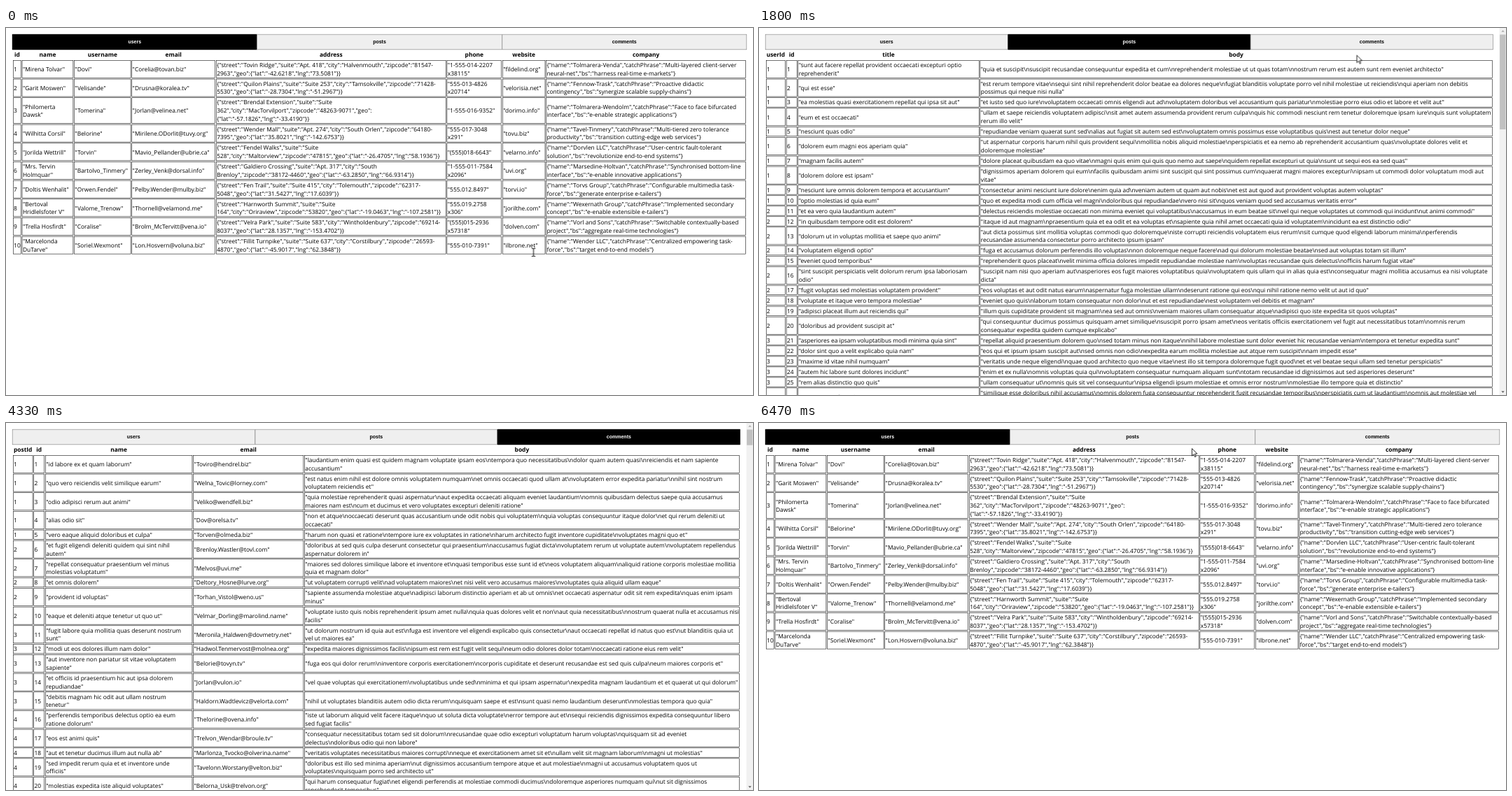
An HTML page that plays this animation: 1067x525 px, repeating every 8470 ms.

```html
<!DOCTYPE html>
<html lang="en">
<head>
<meta charset="utf-8">
<title>Tabbed tables</title>
<style>
html, body { margin: 0; width: 100%; height: 100%; overflow: hidden; background: #fff; }
/* page is laid out at 1920 wide and shown at 1067 */
#page {
  position: absolute; left: 0; top: 0; width: 1920px; height: 945px; overflow: hidden;
  transform: scale(.55573); transform-origin: 0 0;
  font: 15.1px/21px "Open Sans", "Noto Sans", sans-serif; color: #000;
  text-rendering: geometricPrecision;
}
#bar, #page button, .view, svg { animation: 8470ms step-end infinite; }
#bar { position: absolute; left: 16px; top: 16px; width: 1888px; height: 40px; display: flex; animation-name: bar; }
#page button {
  flex: 1 1 0; margin: 0; padding: 0; border: 1px solid #767676; border-radius: 0; background: #efefef;
  font: bold 12.6px "Liberation Sans", Arial, sans-serif; color: #000; pointer-events: none;
}
#page #b-users { animation-name: b-users; }
#page #b-posts { animation-name: b-posts; }
#page #b-comments { animation-name: b-comments; }

.view { position: absolute; inset: 0; }
#users { animation-name: users; }
#posts { animation-name: posts; }
#comments { animation-name: comments; }
table { position: absolute; left: 16px; top: 56px; table-layout: fixed; border-collapse: separate; border-spacing: 2px; white-space: nowrap; }
th { padding: 1px 0; font-weight: 700; }
td { padding: 2px 1px 0; border: 1px solid #000; }
.scroll { position: absolute; right: 0; top: 0; width: 17px; height: 945px; background: #f1f1f1; }
.scroll i { position: absolute; left: 1px; top: 17px; width: 15px; background: #c1c1c1; }
.scroll::before, .scroll::after { content: ""; position: absolute; left: 4.5px; border: 4px solid transparent; }
.scroll::before { top: 2px; border-bottom-color: #a3a3a3; }
.scroll::after { bottom: 2px; border-top-color: #505050; }

svg { position: absolute; left: 0; top: 0; overflow: visible; }
#beam { width: 6px; height: 12px; margin: -6px 0 0 -3px; animation-name: beam; }
#arrow { width: 9px; height: 13px; animation-name: arrow; }

@keyframes bar { 0%, 76.38% { width: 1888px } 21.25% { width: 1871px } }
@keyframes users { 0%, 76.38% { visibility: visible } 21.25%, 76.37% { visibility: hidden } }
@keyframes posts { 0%, 51.12% { visibility: hidden } 21.25% { visibility: visible } }
@keyframes comments { 0%, 76.38% { visibility: hidden } 51.12% { visibility: visible } }
/* button states: idle #efefef, hover #e5e5e5, pressed #f5f5f5, chosen #000 */
@keyframes b-users {
  0%, 75.55%, 100% { background: #000; color: #fff; border-color: #000 }
  19.71% { background: #efefef; color: #000; border-color: #767676 }
  73.19% { background: #e5e5e5; color: #000; border-color: #4f4f4f }
  74.02% { background: #f5f5f5; color: #000; border-color: #8d8d8d }
}
@keyframes b-posts {
  0%, 48.75%, 73.19%, 100% { background: #efefef; color: #000; border-color: #767676 }
  11.8%, 63.75% { background: #e5e5e5; color: #000; border-color: #4f4f4f }
  18.18% { background: #f5f5f5; color: #000; border-color: #8d8d8d }
  19.71% { background: #000; color: #fff; border-color: #000 }
}
@keyframes b-comments {
  0%, 75.55%, 100% { background: #efefef; color: #000; border-color: #767676 }
  44.03% { background: #e5e5e5; color: #000; border-color: #4f4f4f }
  47.22% { background: #f5f5f5; color: #000; border-color: #8d8d8d }
  48.75% { background: #000; color: #fff; border-color: #000 }
}
@keyframes beam {
  0% { transform: translate(753.5px, 321px) }
  .82% { transform: translate(753.5px, 321px); animation-timing-function: steps(11, jump-both) }
  10.27% { transform: translate(808.5px, 75.5px) }
  10.97%, 100% { transform: translate(-50px, -50px) }
}
@keyframes arrow {
  0%, 41.67% { transform: translate(1100px, 34px) }
  10.97% { transform: translate(822px, 55px); animation-timing-function: steps(2, end) }
  12.63% { transform: translate(831px, 38px); animation-timing-function: steps(8, end) }
  18.9% { transform: translate(853.5px, 38.5px) }
  21.26% { transform: translate(853.5px, 38.5px); animation-timing-function: steps(11, end) }
  29.86% { transform: translate(978px, 34px) }
  40.14% { transform: translate(993px, 33px) }
  40.96% { transform: translate(1043px, 33px) }
  63.75% { transform: translate(1090px, 38px); animation-timing-function: steps(12, end) }
  73.19%, 100% { transform: translate(618px, 36px) }
}
</style>
</head>
<body>
<div id="page">
  <div id="bar"><button id="b-users">users</button><button id="b-posts">posts</button><button id="b-comments">comments</button></div>
  <div class="view" id="users"></div>
  <div class="view" id="posts"><div class="scroll"><i style="height:244px"></i></div></div>
  <div class="view" id="comments"><div class="scroll"><i style="height:40px"></i></div></div>
</div>
<svg id="beam" viewBox="0 0 6 12"><path d="M.5.5H2.4L3 1 3.6.5H5.5M3 1V11M.5 11.5H2.4L3 11 3.6 11.5H5.5" fill="none" stroke="#000"/></svg>
<svg id="arrow" viewBox="0 0 13 19"><path d="M.6.8V16.2L4.2 12.8 6.7 18.4 9 17.4 6.6 11.8H11.6Z" fill="#fff" stroke="#000" stroke-width="1.2"/></svg>
<script>
// "~" parts cells, ";" parts fields, "/" is a line break
const users = `
Mirena Tolvar~Dovi~Corelia@tovan.biz~Tovin Ridge;Apt. 418;Halvenmouth;81547-/2963;-42.6218;73.5081~1-555-014-2207/x38115~fildelind.org~Tolmarera-Venda;Multi-layered client-server/neural-net;harness real-time e-markets
Garit Moswen~Velisande~Drusna@koralea.tv~Quilon Plains;Suite 253;Tamsokville;71428-/5530;-28.7304;-51.2967~555-013-4826/x20714~velorisia.net~Fennow-Trask;Proactive didactic/contingency;synergize scalable supply-chains
Philomerta/Dawsk~Tomerina~Jorlan@velinea.net~Brendal Extension;Suite/362;MacTorvilport;48263-9071;-57.1826;-33.4190;/~1-555-016-9352~dorimo.info~Tolmarera-Wendolm;Face to face bifurcated/interface;e-enable strategic applications
Wilhitta Corsil~Belorine~Mirilene.ODorlit@tuvy.org~Wender Mall;Apt. 274;South Orlen;64180-/7395;35.8021;-142.6753~555-017-3048/x291~tovu.biz~Tavel-Tinmery;Multi-tiered zero tolerance/productivity;transition cutting-edge web services
Jorilda Wettrill~Torvin~Mavio_Pellander@ubrie.ca~Fendel Walks;Suite/528;Maltorview;47815;-26.4705;58.1936~(555)018-6643~velarno.info~Dorvlen LLC;User-centric fault-tolerant/solution;revolutionize end-to-end systems
Mrs. Tervin/Holmquar~Bartolvo_Tinmery~Zerley_Venk@dorsal.info~Galdiero Crossing;Apt. 317;South/Brenloy;38172-4460;-63.2850;66.9314~1-555-011-7584/x2096~uvi.org~Marsedine-Holtvan;Synchronised bottom-line/interface;e-enable innovative applications
Doltis Wenhalit~Orwen.Fendel~Pelby.Wender@mulby.biz~Fen Trail;Suite 415;Tolemouth;62317-/5048;31.5427;17.6039~555.012.8497~torvi.io~Torvs Group;Configurable multimedia task-/force;generate enterprise e-tailers
Bertoval/Hridlelsfoter V~Valome_Trenow~Thornell@velamond.me~Harnworth Summit;Suite/164;Oriraview;53820;-19.0463;-107.2581~555.019.2758/x306~jorilthe.com~Wexernath Group;Implemented secondary/concept;e-enable extensible e-tailers
Trella Hosfirdt~Coralise~Brolm_McTervitt@vena.io~Velra Park;Suite 583;Wintholdenbury;69214-/8037;28.1357;-153.4702~(555)015-2936/x57318~dolven.com~Vorl and Sons;Switchable contextually-based/project;aggregate real-time technologies
Marcelonda/DuTarve~Soriel.Wexmont~Lon.Hosvern@voluna.biz~Fillit Turnpike;Suite 637;Corstilbury;26593-/4870;-45.9017;62.3848~555-010-7391~ilbrone.net~Wender LLC;Centralized empowering task-/force;target end-to-end models`;

const posts = String.raw`
sunt aut facere repellat provident occaecati excepturi optio/reprehenderit~quia et suscipit\nsuscipit recusandae consequuntur expedita et cum\nreprehenderit molestiae ut ut quas totam\nnostrum rerum est autem sunt rem eveniet architecto
qui est esse~est rerum tempore vitae\nsequi sint nihil reprehenderit dolor beatae ea dolores neque\nfugiat blanditiis voluptate porro vel nihil molestiae ut reiciendis\nqui aperiam non debitis/possimus qui neque nisi nulla
ea molestias quasi exercitationem repellat qui ipsa sit aut~et iusto sed quo iure\nvoluptatem occaecati omnis eligendi aut ad\nvoluptatem doloribus vel accusantium quis pariatur\nmolestiae porro eius odio et labore et velit aut
eum et est occaecati~ullam et saepe reiciendis voluptatem adipisci\nsit amet autem assumenda provident rerum culpa\nquis hic commodi nesciunt rem tenetur doloremque ipsam iure\nquis sunt voluptatem/rerum illo velit
nesciunt quas odio~repudiandae veniam quaerat sunt sed\nalias aut fugiat sit autem sed est\nvoluptatem omnis possimus esse voluptatibus quis\nest aut tenetur dolor neque
dolorem eum magni eos aperiam quia~ut aspernatur corporis harum nihil quis provident sequi\nmollitia nobis aliquid molestiae\nperspiciatis et ea nemo ab reprehenderit accusantium quas\nvoluptate dolores velit et/doloremque molestiae
magnam facilis autem~dolore placeat quibusdam ea quo vitae\nmagni quis enim qui quis quo nemo aut saepe\nquidem repellat excepturi ut quia\nsunt ut sequi eos ea sed quas
dolorem dolore est ipsam~dignissimos aperiam dolorem qui eum\nfacilis quibusdam animi sint suscipit qui sint possimus cum\nquaerat magni maiores excepturi\nipsam ut commodi dolor voluptatum modi aut/vitae
nesciunt iure omnis dolorem tempora et accusantium~consectetur animi nesciunt iure dolore\nenim quia ad\nveniam autem ut quam aut nobis\net est aut quod aut provident voluptas autem voluptas
optio molestias id quia eum~quo et expedita modi cum officia vel magni\ndoloribus qui repudiandae\nvero nisi sit\nquos veniam quod sed accusamus veritatis error
et ea vero quia laudantium autem~delectus reiciendis molestiae occaecati non minima eveniet qui voluptatibus\naccusamus in eum beatae sit\nvel qui neque voluptates ut commodi qui incidunt\nut animi commodi
in quibusdam tempore odit est dolorem~itaque id aut magnam\npraesentium quia et ea odit et ea voluptas et\nsapiente quia nihil amet occaecati quia id voluptatem\nincidunt ea est distinctio odio
dolorum ut in voluptas mollitia et saepe quo animi~aut dicta possimus sint mollitia voluptas commodi quo doloremque\niste corrupti reiciendis voluptatem eius rerum\nsit cumque quod eligendi laborum minima\nperferendis/recusandae assumenda consectetur porro architecto ipsum ipsam
voluptatem eligendi optio~fuga et accusamus dolorum perferendis illo voluptas\nnon doloremque neque facere\nad qui dolorum molestiae beatae\nsed aut voluptas totam sit illum
eveniet quod temporibus~reprehenderit quos placeat\nvelit minima officia dolores impedit repudiandae molestiae nam\nvoluptas recusandae quis delectus\nofficiis harum fugiat vitae
sint suscipit perspiciatis velit dolorum rerum ipsa laboriosam/odio~suscipit nam nisi quo aperiam aut\nasperiores eos fugit maiores voluptatibus quia\nvoluptatem quis ullam qui in alias quia est\nconsequatur magni mollitia accusamus ea nisi voluptate/dicta
fugit voluptas sed molestias voluptatem provident~eos voluptas et aut odit natus earum\naspernatur fuga molestiae ullam\ndeserunt ratione qui eos\nqui nihil ratione nemo velit ut aut id quo
voluptate et itaque vero tempora molestiae~eveniet quo quis\nlaborum totam consequatur non dolor\nut et est repudiandae\nest voluptatem vel debitis et magnam
adipisci placeat illum aut reiciendis qui~illum quis cupiditate provident sit magnam\nea sed aut omnis\nveniam maiores ullam consequatur atque\nadipisci quo iste expedita sit quos voluptas
doloribus ad provident suscipit at~qui consequuntur ducimus possimus quisquam amet similique\nsuscipit porro ipsam amet\neos veritatis officiis exercitationem vel fugit aut necessitatibus totam\nomnis rerum/consequatur expedita quidem cumque explicabo
asperiores ea ipsam voluptatibus modi minima quia sint~repellat aliquid praesentium dolorem quo\nsed totam minus non itaque\nnihil labore molestiae sunt dolor eveniet hic recusandae veniam\ntempora et tenetur expedita sunt
dolor sint quo a velit explicabo quia nam~eos qui et ipsum ipsam suscipit aut\nsed omnis non odio\nexpedita earum mollitia molestiae aut atque rem suscipit\nnam impedit esse
maxime id vitae nihil numquam~veritatis unde neque eligendi\nquae quod architecto quo neque vitae\nest illo sit tempora doloremque fugit quod\net et vel beatae sequi ullam sed tenetur perspiciatis
autem hic labore sunt dolores incidunt~enim et ex nulla\nomnis voluptas quia qui\nvoluptatem consequatur numquam aliquam sunt\ntotam recusandae id dignissimos aut sed asperiores deserunt
rem alias distinctio quo quis~ullam consequatur ut\nomnis quis sit vel consequuntur\nipsa eligendi ipsum molestiae et omnis error nostrum\nmolestiae illo tempore quia et distinctio
est et quae odio qui non~similique esse doloribus nihil accusamus\nomnis dolorem fuga consequuntur reprehenderit fugit recusandae temporibus\nperspiciatis cum ut laudantium\nomnis aut molestiae vel/vero`;

const comments = String.raw`
id labore ex et quam laborum~Toviro@hendrel.biz~laudantium enim quasi est quidem magnam voluptate ipsam eos\ntempora quo necessitatibus\ndolor quam autem quasi\nreiciendis et nam sapiente/accusantium
quo vero reiciendis velit similique earum~Welna_Tovic@lorney.com~est natus enim nihil est dolore omnis voluptatem numquam\net omnis occaecati quod ullam at\nvoluptatem error expedita pariatur\nnihil sint nostrum/voluptatem reiciendis et
odio adipisci rerum aut animi~Veliko@wendfell.biz~quia molestiae reprehenderit quasi aspernatur\naut expedita occaecati aliquam eveniet laudantium\nomnis quibusdam delectus saepe quia accusamus/maiores nam est\ncum et ducimus et vero voluptates excepturi deleniti ratione
alias odio sit~Dov@orelsa.tv~non et atque\noccaecati deserunt quas accusantium unde odit nobis qui voluptatem\nquia voluptas consequuntur itaque dolor\net qui rerum deleniti ut/occaecati
vero eaque aliquid doloribus et culpa~Torven@olmeda.biz~harum non quasi et ratione\ntempore iure ex voluptates in ratione\nharum architecto fugit inventore cupiditate\nvoluptates magni quo et
et fugit eligendi deleniti quidem qui sint nihil/autem~Brenloy.Wastler@tovl.com~doloribus at sed quis culpa deserunt consectetur qui praesentium\naccusamus fugiat dicta\nvoluptatem rerum ut voluptate autem\nvoluptatem repellendus/aspernatur dolorem in
repellat consequatur praesentium vel minus/molestias voluptatum~Melvos@uvi.me~maiores sed dolores similique labore et inventore et\nquasi temporibus esse sunt id et\neos voluptatem aliquam\naliquid ratione corporis molestiae mollitia/quia et magnam dolor
et omnis dolorem~Deltory_Hosne@lurve.org~ut voluptatem corrupti velit\nad voluptatem maiores\net nisi velit vero accusamus maiores\nvoluptates quia aliquid ullam eaque
provident id voluptas~Torhan_Vistol@weno.us~sapiente assumenda molestiae atque\nadipisci laborum distinctio aperiam et ab ut omnis\net occaecati aspernatur odit sit rem expedita\nquas enim ipsam/minus
eaque et deleniti atque tenetur ut quo ut~Velmar_Dorling@marolind.name~voluptate iusto quis nobis reprehenderit ipsum amet nulla\nquia quas dolores velit et non\naut quia necessitatibus\nnostrum quaerat nulla et accusamus nisi/facilis
fugit labore quia mollitia quas deserunt nostrum/sunt~Meronila_Haldwen@dovmetry.net~ut dolorum nostrum id quia aut est\nfuga est inventore vel eligendi explicabo quis consectetur\naut occaecati repellat id natus quo est\nut blanditiis quia ut/vel ut maiores ea
modi ut eos dolores illum nam dolor~Hadwol.Tenmervost@molnea.org~expedita maiores dignissimos facilis\nipsum est rem est fugit velit sequi\neum odio dolores dolor totam\noccaecati ratione eius rem velit
aut inventore non pariatur sit vitae voluptatem/sapiente~Belorie@tovyn.tv~fuga eos qui dolor rerum\ninventore corporis exercitationem\ncorporis cupiditate et deserunt recusandae est sed quis culpa\neum maiores corporis et
et officiis id praesentium hic aut ipsa dolorem/repudiandae~Jorlan@vulon.io~vel quae voluptas qui exercitationem\nvoluptatibus unde sed\nminima et qui ipsam aspernatur\nexpedita magnam laudantium et et quaerat ut qui dolorum
debitis magnam hic odit aut ullam nostrum/tenetur~Haldorn.Wadtlevicz@velorta.com~nihil ut voluptates blanditiis autem odio dicta rerum\nquisquam saepe et est\nsunt quasi nemo laudantium deserunt\nmolestias tempora quo quia
perferendis temporibus delectus optio ea eum/ratione dolorum~Thelorine@ovena.info~iste ut laborum aliquid velit facere itaque\nquo ut soluta dicta voluptate\nerror tempore aut et\nsequi reiciendis dignissimos expedita consequuntur libero/sed fugiat facilis
eos est animi quis~Trelvon_Wendar@broule.tv~consequatur necessitatibus totam sed sit dolorum\nrecusandae quae odio excepturi voluptatum harum voluptas\nquisquam sit ad eveniet/delectus\ndoloribus odio qui non labore
aut et tenetur ducimus illum aut nulla ab~Marlonza_Tvocko@olverina.name~veritatis voluptates necessitatibus maiores corrupti\nneque et exercitationem amet sit et\nullam velit sit magnam laborum\nmagni ut molestias
sed impedit rerum quia et et inventore unde/officiis~Tavelonn.Worstany@velton.biz~doloribus est illo sed minima aperiam\nut dignissimos accusantium tempore atque et aut molestiae\nmagni ut accusamus voluptatem quos ut/voluptates\nquisquam porro sed architecto ut
molestias expedita iste aliquid voluptates~Belorna_Usk@trelvon.org~qui harum consequatur fugiat\net eligendi perferendis at molestiae commodi ducimus\ndoloremque asperiores numquam qui\nut sit dignissimos/reprehenderit temporibus`;

const quote = s => `"${s}"`;
const address = s => {
  const [street, suite, city, zip, lat, lng, br = ""] = s.split(";");
  return `{"street":"${street}","suite":"${suite}","city":"${city}","zipcode":"${zip}","geo":${br}{"lat":"${lat}","lng":"${lng}"}}`;
};
const company = s => {
  const [name, phrase, bs] = s.split(";");
  return `{"name":"${name}","catchPhrase":"${phrase}","bs":"${bs}"}`;
};
const parse = text => text.trim().split("\n").map(row => row.split("~"));
const owned = (text, per) => parse(text).map((row, i) => [Math.ceil((i + 1) / per), i + 1, ...row.map(quote)]);

// edges: left side of every column, then the left side of the one after the last
function table(id, heads, edges, rows) {
  const cells = (tag, row) => "<tr>" + row.map(c => `<${tag}>${String(c).replaceAll("/", "<br>")}</${tag}>`).join("") + "</tr>";
  const cols = heads.map((_, i) => `<col style="width:${edges[i + 1] - edges[i] - 2}px">`).join("");
  const width = edges[heads.length] - 16;
  document.getElementById(id).insertAdjacentHTML("afterbegin",
    `<table style="width:${width}px"><colgroup>${cols}</colgroup>${cells("th", heads)}${rows.map(r => cells("td", r)).join("")}</table>`);
}

table("users", ["id", "name", "username", "email", "address", "phone", "website", "company"],
  [18, 41, 175, 323, 540, 1133, 1276, 1388, 1904],
  parse(users).map((row, i) => [i + 1, ...row.map((c, k) => (k == 3 ? address : k == 6 ? company : quote)(c))]));
table("posts", ["userId", "id", "title", "body"], [18, 70, 100, 568, 1887], owned(posts, 10));
table("comments", ["postId", "id", "name", "email", "body"], [18, 71, 101, 481, 767, 1887], owned(comments, 5));
</script>
</body>
</html>
```
